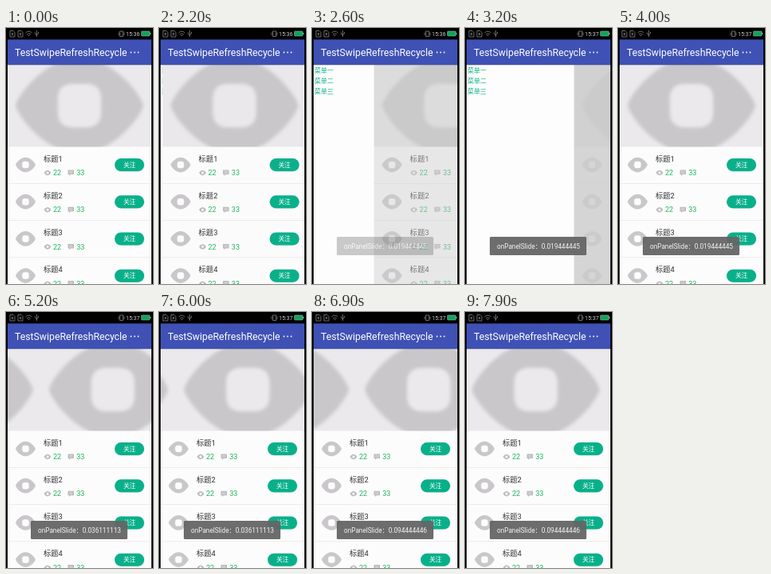
An HTML page that plays this animation: 184x320 px, repeating every 8000 ms.

```html
<!DOCTYPE html>
<html lang="zh">
<head>
<meta charset="utf-8">
<style>
  html, body { margin: 0; width: 100%; height: 100%; overflow: hidden; background: #000; }
  svg { display: block; width: 100vw; height: 100vh; }
  text { font-family: Roboto, "Noto Sans CJK SC", "Noto Sans CJK", sans-serif; }
</style>
</head>
<body>
<svg viewBox="0 0 184 320">
  <defs>
    <path id="eye" fill-rule="evenodd" d="M-1 0C-.95-.2-.5-.75 0-.75C.5-.75.95-.2 1 0C.95.2.5.75 0 .75C-.5.75-.95.2-1 0Z
      M-.34-.1Q-.34-.34-.1-.34H.1Q.34-.34.34-.1V.1Q.34.34.1.34H-.1Q-.34.34-.34.1Z"/>
    <clipPath id="stage"><rect x="2" y="46" width="180" height="274"/></clipPath>
    <clipPath id="bannerBox"><rect x="2" y="46" width="180" height="102.5"/></clipPath>
    <filter id="soft" x="-10%" y="-10%" width="120%" height="120%"><feGaussianBlur stdDeviation="2"/></filter>
  </defs>

  <rect width="184" height="320"/>
  <g fill="none" stroke="#999" stroke-width=".7">
    <path d="M5 3.500h4l2 2v5.500h-6zM15 3.500h4l2 2v5.500h-6zM7 6l2 3M9 6l-2 3M17 6l2 3M19 6l-2 3"/>
    <path d="M24.500 6q4-3.500 8 0M26 8q2.500-2 5 0M27.500 9.500h2"/>
    <path d="M38.500 3v8M36.500 5.500v2l2 1.500M40.500 5v2l-2 1.500"/>
    <path d="M142.500 4h4v6.500h-4zM141 5.500v3.500M148 5.500v3.500"/>
  </g>
  <text id="clock" x="150" y="9.700" font-size="7" fill="#ccc"></text>
  <rect x="169.500" y="4" width="10.500" height="6" rx=".8" fill="#0fa35c" stroke="#8fb5a2" stroke-width=".6"/>
  <rect x="180" y="6" width="1.200" height="2" fill="#8fb5a2"/>

  <g clip-path="url(#stage)">
    <rect x="2" y="46" width="180" height="274" fill="#fdfdfd"/>
    <g font-size="8" fill="#0fb48a">
      <text x="3" y="55.800">菜单一</text>
      <text x="3" y="68.800">菜单二</text>
      <text x="3" y="81.800">菜单三</text>
    </g>
    <g id="panel">
      <rect x="2" y="46" width="180" height="274" fill="#fdfcfd"/>
      <g clip-path="url(#bannerBox)">
        <rect x="2" y="46" width="180" height="103" fill="#ebe9eb"/>
        <g id="pages" fill="#c9c7c9" filter="url(#soft)"></g>
      </g>
      <g id="rows"></g>
      <rect id="shade" x="2" y="46" width="180" height="274" fill="#ccc"/>
    </g>
  </g>

  <rect x="2" y="14.400" width="180" height="31.600" fill="#3f51b5"/>
  <rect x="2" y="46" width="180" height="1" opacity=".15"/>
  <text x="11" y="34.500" font-size="12.270" fill="#fff">TestSwipeRefreshRecycle</text>
  <g fill="#fff"><circle cx="156.500" cy="30.500" r=".9"/><circle cx="161" cy="30.500" r=".9"/><circle cx="165.500" cy="30.500" r=".9"/></g>

  <g id="toast">
    <rect x="31" y="261" width="121" height="23" rx="1.500" fill="#666" fill-opacity=".95"/>
    <text id="message" x="92" y="275.500" font-size="8.200" text-anchor="middle" fill="#f4f4f4"></text>
  </g>
</svg>
<script>
const LOOP = 8000, PAGE = 180, OPEN = 134.5;
const $ = id => document.getElementById(id);

// Banner swipes: start and end in ms.
const swipes = [[4060, 4500], [4530, 4900], [5074, 5480], [5540, 5900],
  [5930, 6280], [6300, 6600], [6810, 7060], [7330, 7500], [7730, 7916]];
const toasts = [[2500, '0.019444445'], [4450, '0.036111113'], [6400, '0.094444446']];

const eye = (x, y, size) => `<use href="#eye" transform="translate(${x} ${y}) scale(${size})"/>`;

const row = (_, i) => `<g transform="translate(0 ${148.5 + 46.2 * i})">
  <g fill="#c9c7c9">${eye(24.5, 22.5, 12.5)}</g>
  <text x="47" y="18.200" font-size="9.300" fill="#333">标题${i + 1}</text>
  <g fill="#bbb">${eye(52, 32.5, 4.3)}<path d="M77.500 29h7.500v5.500h-4l-2 1.800v-1.800h-1.500z"/></g>
  <path d="M79 31h4.500M79 32.700h4.500" stroke="#eee" stroke-width=".6"/>
  <g font-size="9" fill="#1cb658"><text x="59" y="35.700">22</text><text x="88.300" y="35.700">33</text></g>
  <rect x="136" y="15.200" width="37" height="16" rx="8" fill="#cfe3dc"/>
  <rect x="136" y="14.600" width="37" height="16" rx="8" fill="#08b08a"/>
  <text x="154.500" y="25.400" font-size="7.600" text-anchor="middle" fill="#fff">关注</text>
  <rect x="2" y="45.600" width="180" height=".7" fill="#e6e6e6"/></g>`;

$('rows').innerHTML = Array.from({ length: 4 }, row).join('');
$('pages').innerHTML = eye(92 - PAGE, 97, 80) + eye(92, 97, 80);

function ease(t, start, end) {
  const x = Math.min(1, Math.max(0, (t - start) / (end - start)));
  return x * x * (3 - 2 * x);
}

function draw(t) {
  const open = ease(t, 2130, 3000) - ease(t, 3620, 3980);
  $('panel').setAttribute('transform', `translate(${OPEN * open})`);
  $('shade').setAttribute('opacity', 0.8 * open);

  const scroll = swipes.reduce((sum, [start, end]) => sum + ease(t, start, end), 0) % 1;
  $('pages').setAttribute('transform', `translate(${PAGE * scroll})`);

  $('clock').textContent = t < 3200 ? '15:36' : '15:37';
  const current = toasts.filter(([start]) => t >= start).pop();
  $('message').textContent = current ? 'onPanelSlide：' + current[1] : '';
  $('toast').setAttribute('opacity', ease(t, 2500, 2750));
}

function tick() {
  draw(performance.now() % LOOP);
  requestAnimationFrame(tick);
}
tick();
</script>
</body>
</html>
```
